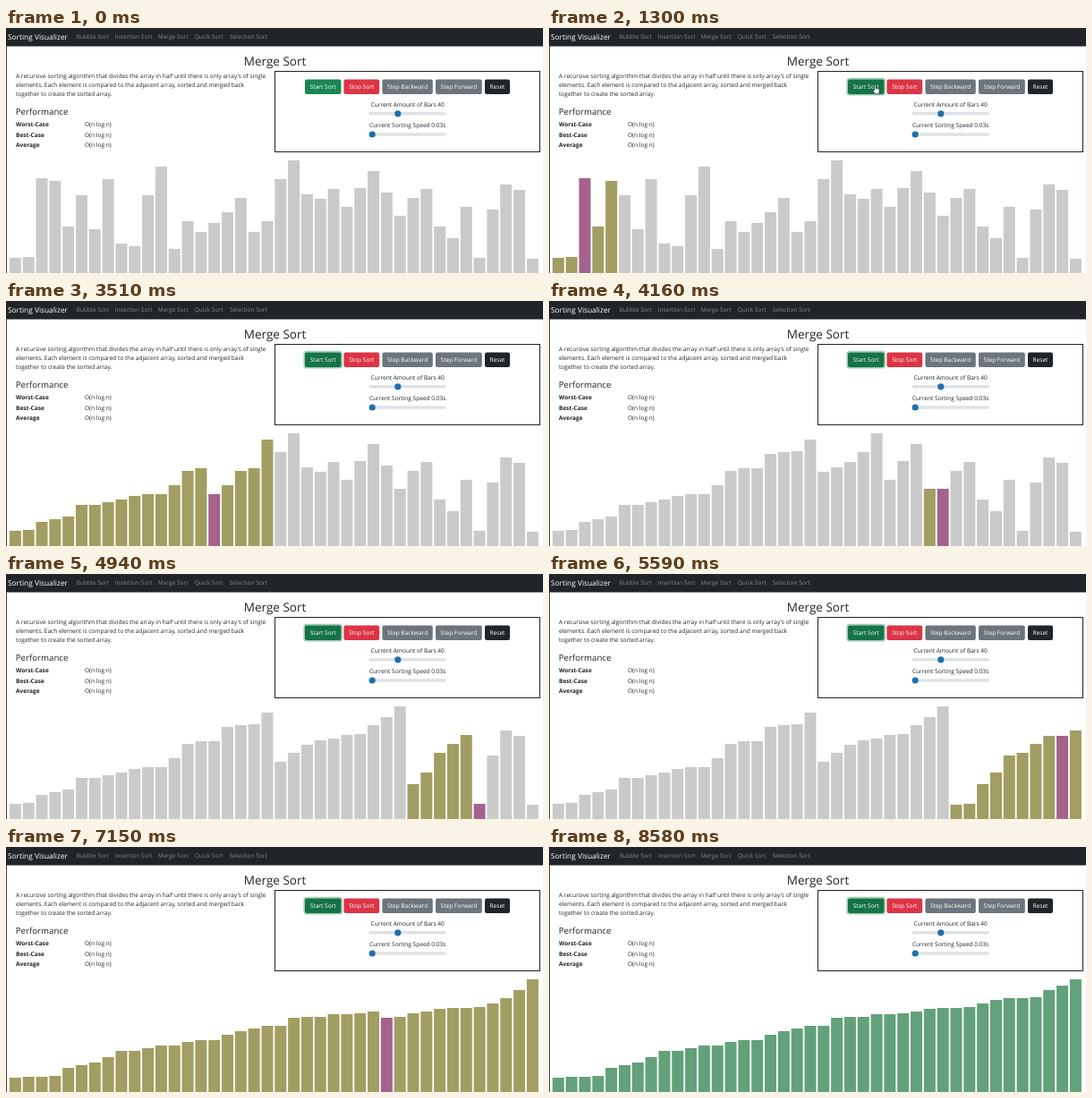
These frames come from a looping animation (600x274 px, 8.71 s). An HTML page with a canvas:

```html
<!DOCTYPE html>
<html lang="en">
<head>
<meta charset="utf-8">
<title>Sorting Visualizer</title>
<style>
  html, body { margin: 0; width: 100%; height: 100%; overflow: hidden; background: #fff; }
  canvas, svg { position: absolute; left: 0; top: 0; width: 600px; height: 274px; }
  text {
    font: 6.57px "Open Sans", "Noto Sans", sans-serif;
    fill: #212529;
    text-rendering: geometricPrecision;
  }
  .brand { font-size: 8.35px; fill: #fff; }
  .nav text { font-size: 6.6px; fill: #85888b; }
  .title { font-size: 13.5px; font-weight: 500; }
  .sub { font-size: 9.7px; font-weight: 500; }
  .bold { font-weight: 700; }
  .mid { text-anchor: middle; }
  .buttons text { fill: #fff; text-anchor: middle; }
</style>
</head>
<body>
<canvas id="bars" width="600" height="274"></canvas>
<svg viewBox="0 0 600 274">
  <rect width="600" height="20.5" fill="#212529"/>
  <rect y="20" width="1" height="254" fill="#444"/>
  <text class="brand" x="2" y="12.7">Sorting Visualizer</text>
  <g class="nav">
    <text x="78.7" y="12.2">Bubble Sort</text>
    <text x="121.7" y="12.2">Insertion Sort</text>
    <text x="169.7" y="12.2">Merge Sort</text>
    <text x="210.7" y="12.2">Quick Sort</text>
    <text x="249.7" y="12.2">Selection Sort</text>
  </g>

  <text class="title mid" x="300.5" y="42">Merge Sort</text>
  <text x="11" y="55.9">A recursive sorting algorithm that divides the array in half until there is only array's of single</text>
  <text x="11" y="66.2">elements. Each element is compared to the adjacent array, sorted and merged back</text>
  <text x="11" y="76.4">together to create the sorted array.</text>

  <text class="sub" x="10.7" y="96.6">Performance</text>
  <text class="bold" x="11" y="110.4">Worst-Case</text><text x="88" y="110.4">O(n log n)</text>
  <text class="bold" x="11" y="121.8">Best-Case</text><text x="88" y="121.8">O(n log n)</text>
  <text class="bold" x="11" y="133.1">Average</text><text x="88" y="133.1">O(n log n)</text>

  <rect x="300.5" y="48.5" width="296" height="90" fill="none" stroke="#222"/>
  <g class="buttons">
    <rect id="ring" x="333.2" y="56.7" width="42" height="18" rx="2.8" fill="none" stroke="#9dccb6" stroke-width="1.7"/>
    <rect id="start" x="334" y="57.5" width="40.4" height="16.4" rx="2" fill="#198754"/>
    <rect x="377.4" y="57.5" width="39.8" height="16.4" rx="2" fill="#dc3545"/>
    <rect x="420.4" y="57.5" width="56.4" height="16.4" rx="2" fill="#6c757d"/>
    <rect x="480" y="57.5" width="51.8" height="16.4" rx="2" fill="#6c757d"/>
    <rect x="535" y="57.5" width="28" height="16.4" rx="2" fill="#212529"/>
    <text x="354.2" y="68.1">Start Sort</text>
    <text x="397.3" y="68.1">Stop Sort</text>
    <text x="448.6" y="68.1">Step Backward</text>
    <text x="505.9" y="68.1">Step Forward</text>
    <text x="549" y="68.1">Reset</text>
  </g>

  <text class="mid" x="448.7" y="88">Current Amount of Bars 40</text>
  <rect x="405.5" y="94" width="86.5" height="3.6" rx="1.8" fill="#dee2e6"/>
  <circle cx="437.8" cy="95.8" r="3.6" fill="#1f70ab"/>
  <text class="mid" x="448.7" y="111.2">Current Sorting Speed 0.03s</text>
  <rect x="405.5" y="117.2" width="86.5" height="3.6" rx="1.8" fill="#dee2e6"/>
  <circle cx="409.2" cy="119" r="3.6" fill="#1f70ab"/>

  <path id="hand" d="M0 0 q1-.7 1.5.4 v3.4 l3.2.8 q1 .4.9 1.6 l-.5 4 h-4.4 l-2.5-3.8 q0-1 1-.7 l.8.8 z"
        fill="#fff" stroke="#111" stroke-width=".6"/>
</svg>
<script>
const LOOP = 8710, TICK = 130;
const HOVER = 910, CLICK = 1040, LEAVE = 1820;
const FLOOR = 274, PITCH = 14.82, WIDTH = 13;
const GREY = '#cacaca', OLIVE = '#a29d62', PURPLE = '#a4628c', GREEN = '#62a179';

// Top edge of every bar; a lower edge means a smaller value.
const tops = [
  257, 256, 168, 171, 222, 187, 225, 169, 241, 244,
  187, 155, 247, 216, 228, 218, 206, 190, 228, 216,
  169, 148, 186, 191, 180, 200, 179, 160, 184, 210,
  190, 180, 222, 235, 200, 257, 203, 175, 181, 258
];

// Time against the number of merge steps shown.
const pace = [
  [1040, -1], [1300, 8], [2470, 48], [3510, 82],
  [4940, 133], [6240, 172], [7540, 216]
];

const steps = [];

function mergeSort(a, lo, hi) {
  if (hi - lo < 2) return;
  const mid = Math.ceil((lo + hi) / 2);
  mergeSort(a, lo, mid);
  mergeSort(a, mid, hi);
  const left = a.slice(lo, mid), right = a.slice(mid, hi);
  for (let k = lo; k < hi; k++) {
    const useLeft = !right.length || (left.length && left[0] >= right[0]);
    a[k] = (useLeft ? left : right).shift();
    steps.push({ tops: a.slice(), lo, hi, cursor: k + 1 });
  }
}

const sorted = tops.slice();
mergeSort(sorted, 0, sorted.length);

function stepAt(t) {
  if (t <= pace[0][0]) return -1;
  for (let i = 1; i < pace.length; i++) {
    const [t0, s0] = pace[i - 1], [t1, s1] = pace[i];
    if (t <= t1) return Math.round(s0 + (s1 - s0) * (t - t0) / (t1 - t0));
  }
  return steps.length;
}

const $ = id => document.getElementById(id);
const ctx = $('bars').getContext('2d');
const ring = $('ring'), start = $('start'), hand = $('hand');

function drawBars(heights, colorOf) {
  ctx.clearRect(0, 0, 600, FLOOR);
  heights.forEach((top, i) => {
    ctx.fillStyle = colorOf(i);
    ctx.fillRect(3.9 + i * PITCH, top, WIDTH, FLOOR - top);
  });
}

function draw(t) {
  const n = stepAt(t);
  if (n < 0) {
    drawBars(tops, () => GREY);
  } else if (n >= steps.length) {
    drawBars(sorted, () => GREEN);
  } else {
    const { tops: now, lo, hi, cursor } = steps[n];
    drawBars(now, i => i === cursor ? PURPLE : i >= lo && i < hi ? OLIVE : GREY);
  }

  start.setAttribute('fill', t >= HOVER ? '#157347' : '#198754');
  ring.style.visibility = t >= CLICK ? 'visible' : 'hidden';
  hand.style.visibility = t >= HOVER && t < LEAVE ? 'visible' : 'hidden';
  hand.setAttribute('transform', 'translate(363.6 63.6)');
}

function loop() {
  const t = performance.now() % LOOP;
  draw(Math.floor(t / TICK) * TICK);
  requestAnimationFrame(loop);
}
loop();
</script>
</body>
</html>
```
